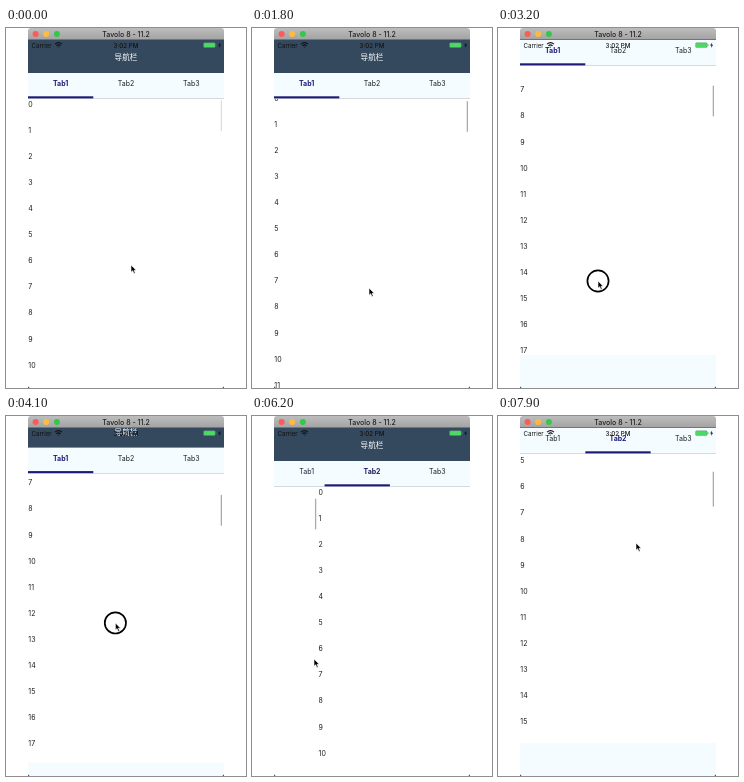
An HTML page for the animation above (8000 ms loop, 240 by 360 pixels).

```html
<!DOCTYPE html>
<html lang="zh">
<head>
<meta charset="utf-8">
<style>
  html, body { margin: 0; width: 100%; height: 100%; overflow: hidden; background: #fff; }
  svg { display: block; }
  text { font: 7px Inter, "Noto Sans", sans-serif; fill: #1c1c1c; }
  .mid { text-anchor: middle; }
  .title { font-weight: 500; }
  .nav { font: 7.6px "Noto Sans CJK SC", "Noto Sans CJK", sans-serif; fill: #fff; }
  .status { font-size: 6.2px; fill: #111; }
  .clock { font-weight: 500; }
</style>
</head>
<body>
<svg width="240" height="360" viewBox="0 0 240 360">
  <defs>
    <linearGradient id="chrome" x2="0" y2="1">
      <stop stop-color="#bdbdbd"/><stop offset="1" stop-color="#a3a3a3"/>
    </linearGradient>
  </defs>

  <svg x="22" y="11" width="196" height="349" viewBox="22 11 196 349">
    <rect x="22" y="11" width="196" height="349" fill="#f5fcff"/>
    <g id="app">
      <rect x="22" y="-22" width="196" height="67" fill="#34495e"/>
      <text class="mid nav" x="120" y="31.8">导航栏</text>
      <rect x="22" y="45" width="196" height="26" fill="#f5fcff"/>
      <rect x="22" y="70.2" width="196" height=".8" fill="#ccd2d5"/>
      <g id="tabs"></g>
      <rect id="line" x="22" y="68.3" width="65.3" height="2.1" fill="#1c1c78"/>
      <svg x="22" y="71" width="196" height="289">
        <rect width="196" height="289" fill="#fff"/>
        <g id="pages"></g>
      </svg>
    </g>
    <g>
      <text class="status" x="25.4" y="19.6">Carrier</text>
      <g fill="none" stroke="#111" stroke-width="1.1">
        <path d="M49 16.2Q52.5 13 56 16.2M50.4 17.8Q52.5 15.8 54.6 17.8"/>
        <path d="M51.5 18.7h2l-1 1z" fill="#111" stroke="none"/>
      </g>
      <text class="status clock mid" x="120" y="19.6">3:02 PM</text>
      <rect x="197.6" y="14.8" width="11.6" height="4.8" rx="1" fill="#4cd964" stroke="#5d8273" stroke-width=".4"/>
      <rect x="209.7" y="16.2" width=".7" height="2" fill="#5d8273"/>
      <path d="M214.2 14.4l-2.1 3.1h1.4l-.5 2.4 2.1-3.1h-1.4z" fill="#111"/>
    </g>
    <path d="M22 358v2h2q-2 0-2-2M218 358v2h-2q2 0 2-2" fill="#000"/>
  </svg>

  <path d="M22 11.5V3q0-3 3-3H215q3 0 3 3v8.5z" fill="url(#chrome)"/>
  <circle cx="29.6" cy="6" r="3" fill="#fc5b57"/>
  <circle cx="40.2" cy="6" r="3" fill="#fdbc40"/>
  <circle cx="50.9" cy="6" r="3" fill="#34c84a"/>
  <text class="mid title" x="120" y="8.6">Tavolo 8 - 11.2</text>

  <g id="cursor">
    <circle id="ring" r="10.6" fill="none" stroke="#000" stroke-width="1.7"/>
    <path d="M0 0V7.2L1.7 5.7 2.9 8.5 4.2 7.9 3 5.3H5.2z" fill="#000" stroke="#fff" stroke-width=".6"/>
  </g>
</svg>

<script>
const LOOP = 8000, STEP = 100;
const PITCH = 26.1, VIEW = 289, WIDTH = 196, TAB = WIDTH / 3;
const HIDE = 33, HIDE_DELAY = 130, HIDE_TIME = 300, TRAVEL = 300;
const $ = id => document.getElementById(id);

// Finger drags; the list keeps gliding after release, a held finger stays down
const drags = [
  { start: 300, end: 900, from: [130, 236], to: [133, 178.5], scroll: 37, glide: 100 },
  { start: 1300, end: 1800, from: [131, 186], to: [117, 260], scroll: -31 },
  { start: 2000, end: 2600, from: [115, 262], to: [105, 195], scroll: 158, glide: 500 },
  { start: 3200, end: 3600, from: [100, 253], to: [103, 205], scroll: 31, glide: 100 },
  { start: 3800, end: 5000, from: [105, 200], to: [133, 244], scroll: -104, hold: 300 },
  { start: 5300, end: 6000, from: [133, 244], to: [62, 243], swipe: 1, glide: 600 },
  { start: 7170, end: 7700, from: [127.5, 236.5], to: [138, 127], scroll: 128.8, glide: 200, page: 1 }
];

function ease(x) {
  x = Math.min(1, Math.max(0, x));
  return x * x * (3 - 2 * x);
}
const toward = (a, b, k) => a.map((v, i) => v + (b[i] - v) * k);
const move = (el, x, y) => el.setAttribute("transform", `translate(${x} ${y})`);

function stateAt(t) {
  const s = { pointer: [125, 237], pressed: false, scroll: [0, 0], page: 0, shift: 0 };
  let free = 0;
  for (const { start, end, from, to, scroll = 0, swipe = 0, glide = 0, hold = 0, page = 0 } of drags) {
    const leave = Math.max(free, start - TRAVEL);
    s.pointer = toward(s.pointer, from, ease((t - leave) / (start - leave || 1)));
    s.pointer = toward(s.pointer, to, ease((t - start) / (end - start)));
    s.pressed ||= t >= start && t < end + hold;
    free = end + hold;

    const k = ease((t - start) / (end + glide - start));
    s.scroll[page] += scroll * k;
    s.page += swipe * k;
    // Scrolling down hides the header, scrolling up brings it back
    if (scroll) {
      const goal = scroll > 0 ? HIDE : 0;
      s.shift += (goal - s.shift) * ease((t - start - HIDE_DELAY) / HIDE_TIME);
    }
  }
  return s;
}

function add(parent, tag, attrs = {}, text = "") {
  const el = document.createElementNS("http://www.w3.org/2000/svg", tag);
  for (const k in attrs) el.setAttribute(k, attrs[k]);
  el.textContent = text;
  return parent.appendChild(el);
}

const tabs = [0, 1, 2].map(n =>
  add($("tabs"), "text", { class: "mid", x: 22 + (n + .5) * TAB, y: 58.2 }, "Tab" + (n + 1)));

const pages = [100, 88].map((count, n) => {
  const page = add($("pages"), "g", { transform: `translate(${n * WIDTH} 0)` });
  const rows = add(page, "g");
  for (let i = 0; i < 24; i++) add(rows, "text", { x: .3, y: 7.6 + i * PITCH }, i);
  const ratio = VIEW / (count * PITCH);
  const bar = add(page, "rect", { x: 192.7, y: 1.3, width: 1.3, height: VIEW * ratio - 1, rx: .65 });
  return { rows, bar, ratio };
});

function draw(t) {
  const { pointer, pressed, scroll, page, shift } = stateAt(t);
  move($("app"), 0, -shift);
  move($("pages"), -page * WIDTH, 0);
  move($("line"), page * TAB, 0);
  tabs.forEach((tab, i) => {
    const on = Math.max(0, 1 - Math.abs(page - i));
    tab.style.fill = `rgb(28,28,${28 + 92 * on})`;
    tab.style.fontWeight = on > .5 ? 700 : 400;
  });
  pages.forEach(({ rows, bar, ratio }, i) => {
    move(rows, 0, -scroll[i]);
    move(bar, 0, scroll[i] * ratio);
    bar.setAttribute("opacity", .13 + .2 * ease(t / drags[0].start));
  });
  move($("cursor"), ...pointer);
  $("ring").style.display = pressed ? "" : "none";
}

const start = performance.now();
function tick(now) {
  const t = Math.max(0, now - start) % LOOP;
  draw(Math.floor(t / STEP) * STEP);
  requestAnimationFrame(tick);
}
draw(0);
requestAnimationFrame(tick);
</script>
</body>
</html>
```
